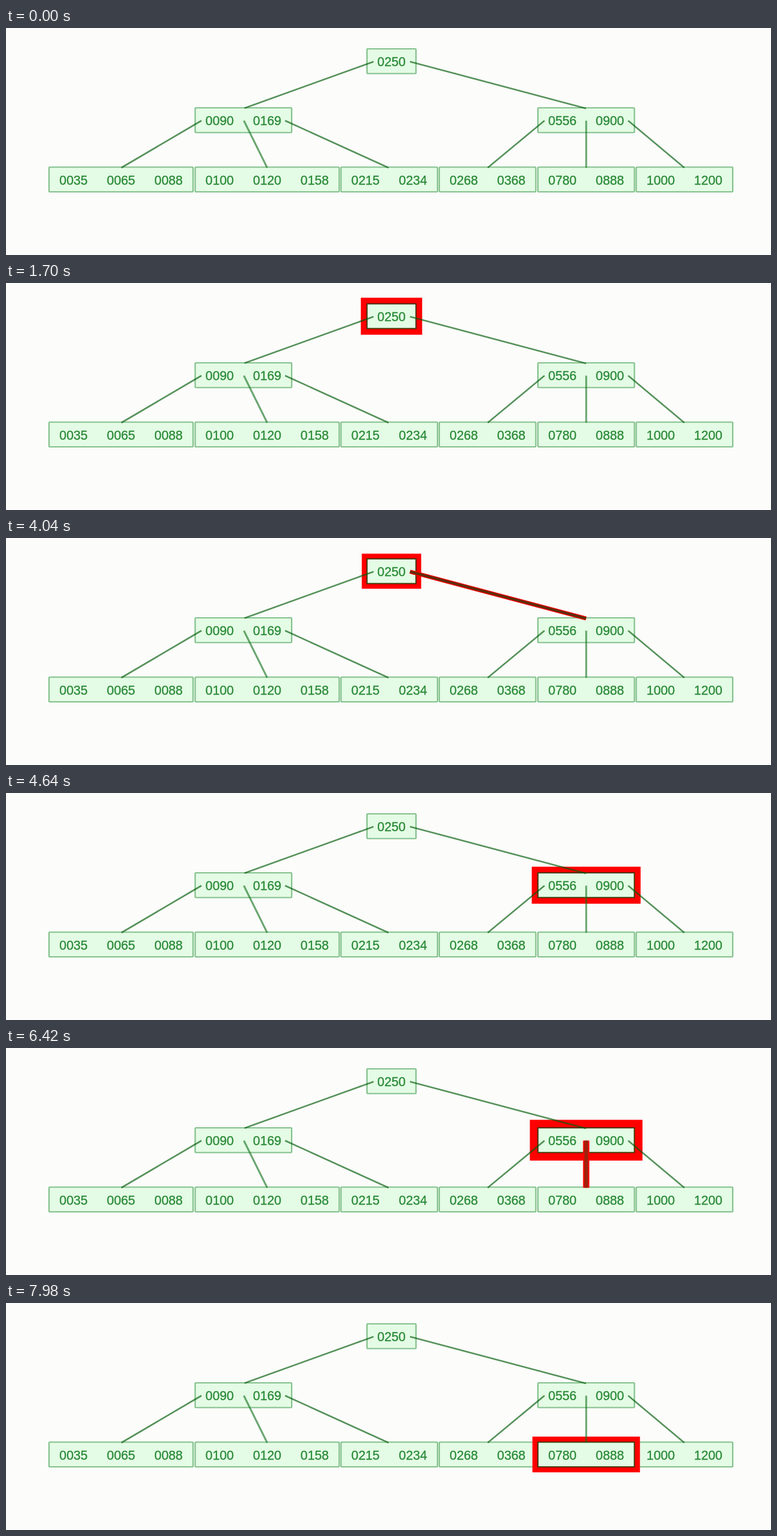
These frames come from a looping animation (1280x381 px, 8000 ms). An HTML page:

```html
<!DOCTYPE html>
<html lang="en">
<head>
<meta charset="utf-8">
<title>Tree search</title>
<style>
  html, body { margin: 0; width: 100%; height: 100%; overflow: hidden; background: #fcfcfb; }
  svg { display: block; width: 1280px; height: 381px; }
  text { font: 21.3px "Liberation Sans", Arial, sans-serif; fill: #2a8a38; stroke: #2a8a38; stroke-width: .35; text-anchor: middle; }
  .box { fill: #e4fbe5; stroke: #82c08a; stroke-width: 2.2; }
  .edge { stroke: rgba(0, 92, 8, .66); stroke-width: 2.7; }
  .edge.soft { stroke: rgba(20, 115, 30, .62); stroke-width: 3.1; }
  .ring { fill: none; stroke: #f00; }
  .rim { fill: none; stroke: #3f3a08; stroke-width: 1.8; }
  .glow { stroke: #f00; }
</style>
</head>
<body>
<svg viewBox="0 0 1280 381">
  <g id="boxes"></g>
  <g id="rings"></g>
  <g id="edges"></g>
  <g id="glows"></g>
  <g id="labels"></g>
</svg>
<script>
const LOOP = 8000, START = 840, STEP = 1680;   // one search step every STEP ms
const HALF_PULSE = 2940, PULSE_MIN_AT = 3171;
const HEIGHT = 41.5, CELL = 82, PITCH = 79.5;

// x, y, labels
const NODES = [
  [604, 35, '0250'],
  [316.5, 134, '0090 0169'],
  [890, 134, '0556 0900'],
  [72, 233.5, '0035 0065 0088'],
  [316.5, 233.5, '0100 0120 0158'],
  [560.5, 233.5, '0215 0234'],
  [725, 233.5, '0268 0368'],
  [890, 233.5, '0780 0888'],
  [1054.5, 233.5, '1000 1200']
];

// x1, y1, x2, y2
const EDGES = [
  [615, 56.5, 399, 134.5], [676, 56.5, 970.5, 135],
  [327, 155.5, 193, 234.5], [398, 155.5, 437, 234.5], [467, 155.5, 640, 234.5],
  [901, 155.5, 806, 234.5], [970.8, 155.5, 970.8, 234.5], [1041, 155.5, 1135, 234.5]
];

function add(parent, tag, attrs, text) {
  const el = document.createElementNS('http://www.w3.org/2000/svg', tag);
  for (const key in attrs) el.setAttribute(key, attrs[key]);
  if (text) el.textContent = text;
  return (typeof parent === 'string' ? document.getElementById(parent) : parent).appendChild(el);
}

function frame([x, y, labels], grow = 0) {
  const width = CELL + PITCH * (labels.split(' ').length - 1);
  return { x: x - grow, y: y - grow, width: width + 2 * grow, height: HEIGHT + 2 * grow };
}

function line([x1, y1, x2, y2]) {
  return { x1, y1, x2, y2 };
}

for (const node of NODES) {
  const [x, y, labels] = node;
  add('boxes', 'rect', { ...frame(node), rx: 1, class: 'box' });
  labels.split(' ').forEach((label, k) =>
    add('labels', 'text', { x: x + CELL / 2 + PITCH * k, y: y + 29 }, label));
}

EDGES.forEach((edge, i) =>
  add('edges', 'line', { ...line(edge), class: i === 3 || i === 6 ? 'edge soft' : 'edge' }));

function makeRing(index, from, to) {
  const g = add('rings', 'g', {});
  const ring = add(g, 'rect', { class: 'ring' });
  add(g, 'rect', { ...frame(NODES[index]), class: 'rim' });
  return {
    g, from, to,
    draw(size) {
      const box = frame(NODES[index], size / 2);
      for (const key in box) ring.setAttribute(key, box[key]);
      ring.setAttribute('stroke-width', size + 0.6);
    }
  };
}

function makeGlow(index, from, to, core) {
  const g = add('glows', 'g', {});
  const glow = add(g, 'line', { ...line(EDGES[index]), class: 'glow' });
  const mid = add(g, 'line', { ...line(EDGES[index]), stroke: core });
  return {
    g, from, to,
    draw(size) {
      glow.setAttribute('stroke-width', size * 0.8);
      mid.setAttribute('stroke-width', size * 0.5);
    }
  };
}

// spans are counted in search steps
const marks = [
  makeRing(0, 0, 2),
  makeGlow(1, 1, 2, '#5f2c06'),
  makeRing(2, 2, 4),
  makeGlow(6, 3, 4, '#a0200c'),
  makeRing(7, 4, 6)
];

function pulse(t) {
  const phase = Math.abs(t - PULSE_MIN_AT) / HALF_PULSE % 2;
  return 6 + 8 * (1 - Math.abs(1 - phase));
}

function render(now) {
  const t = now % LOOP;
  const step = (t - START) / STEP;
  const size = pulse(t);
  for (const mark of marks) {
    const on = step >= mark.from && step < mark.to;
    mark.g.style.display = on ? '' : 'none';
    if (on) mark.draw(size);
  }
}

let begin;
function tick(now) {
  begin ??= now;
  render(now - begin);
  requestAnimationFrame(tick);
}
render(0);
requestAnimationFrame(tick);
</script>
</body>
</html>
```
